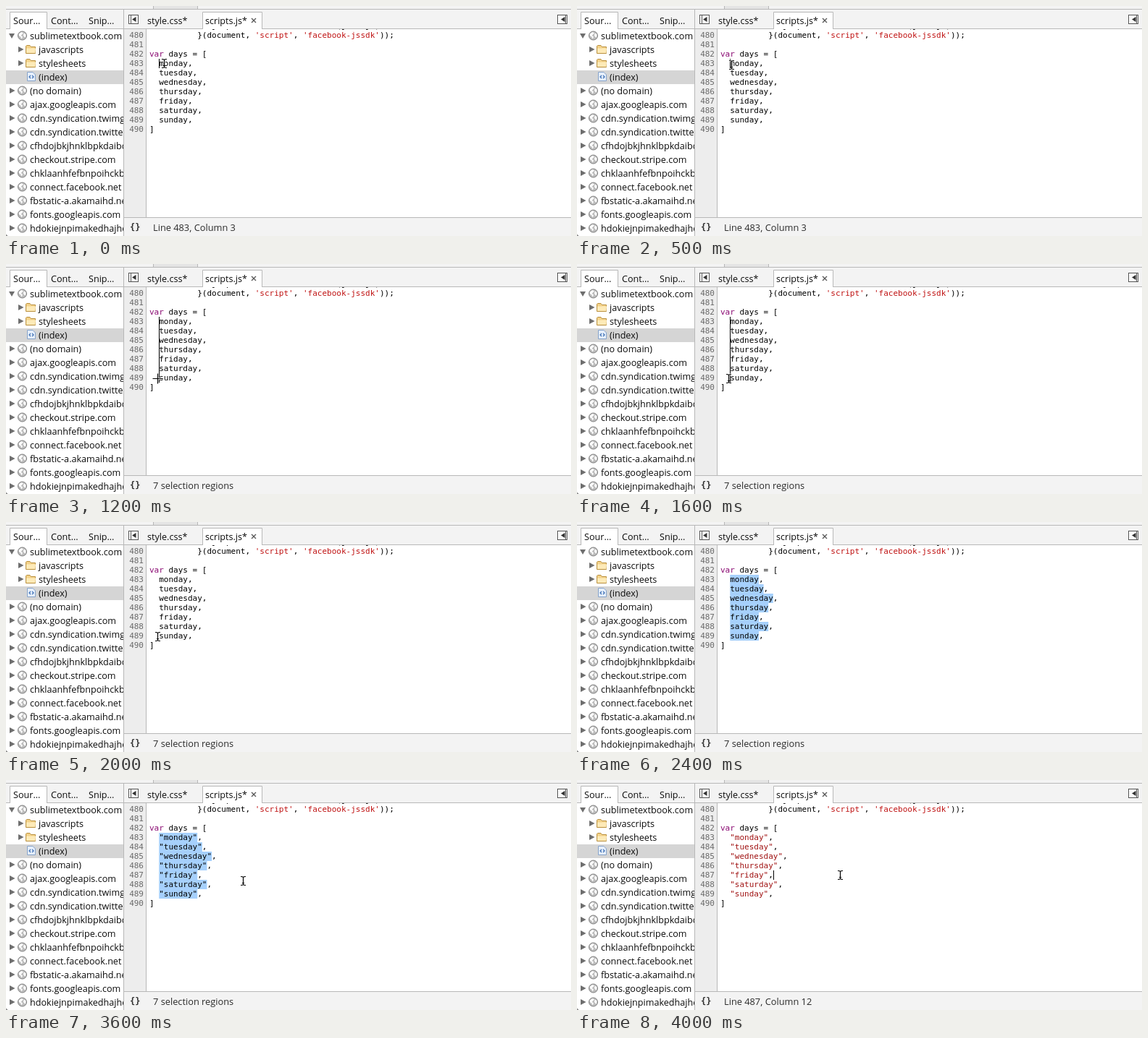
An HTML page that plays this animation: 780x318 px, repeating every 4.2 s.

```html
<!DOCTYPE html>
<html lang="en">
<head>
<meta charset="utf-8">
<title>Multiple selections</title>
<style>
html, body { margin: 0; width: 100%; height: 100%; overflow: hidden; background: #fff; }
svg { display: block; width: 780px; height: 318px; }
text { white-space: pre; }
.ui { font: 12.6px "Open Sans", "Noto Sans", sans-serif; fill: #0c0c0c; }
.code { font: 11px "DejaVu Sans Mono", "Noto Sans Mono", monospace; fill: #000; }
.num { fill: #6a6a6a; text-anchor: end; }
.kw { fill: #8a0a72; }
.str { fill: #c01414; }
.day { fill: #a01212; }
.braces { font: bold 12px "DejaVu Sans Mono", monospace; fill: #333; }
#status { font-size: 12.8px; fill: #2c2c2c; }
.line { stroke: #b8b8b8; fill: none; }
</style>
</head>
<body>
<svg id="stage" viewBox="0 0 780 318">
  <defs>
    <clipPath id="sideClip"><rect y="32" width="162" height="286"/></clipPath>
    <clipPath id="codeClip"><rect x="163" y="32" width="617" height="260"/></clipPath>
    <g id="globe">
      <circle r="6" fill="#bdbdbd" stroke="#7e7e7e"/>
      <path d="M-4.6-2.6L-1-5L1.4-3.8L-.6-1.6L-2-.2L.4 1.4L-.8 4.6L-2.4 1.6L-4.8 0ZM2.4-3.6L5-1.6L4.4 2.4L2.4 1.6L1.4-.8Z" fill="#fff"/>
    </g>
    <g id="folder">
      <path d="M.5 11.5V1.5L1.5.5H6L7.5 2.5H13.5V11.5Z" fill="#f3d28a" stroke="#b98f3c"/>
      <path d="M1 4.5H14L13.5 11H1Z" fill="#fdeab8"/>
    </g>
    <g id="dock">
      <rect x=".5" y=".5" width="13" height="12" fill="#fafafa" stroke="#555"/>
      <path d="M10.5 3V10L5 6.5Z" fill="#333"/>
    </g>
  </defs>

  <rect width="780" height="318" fill="#fff"/>
  <rect width="780" height="31" fill="#f3f3f3"/>
  <rect x="203" width="62" height="4" fill="#e4e4e4"/>
  <path class="line" d="M0 4.5H780M203.5 0V4M264.5 0V4"/>
  <path class="line" d="M0 31.5H780"/>
  <path class="line" d="M5.5 32V8.5H56.5V32M271.5 32V8.5H353.5V32" style="fill:#fff"/>
  <path d="M6 31.5H56M272 31.5H353" stroke="#fff"/>
  <g class="ui">
    <text x="10" y="24.5">Sour…</text>
    <text x="62" y="24.5">Cont…</text>
    <text x="114" y="24.5">Snip…</text>
    <text x="195" y="24.5">style.css*</text>
    <text x="275" y="24.5">scripts.js*</text>
  </g>
  <path d="M339 17L345 23M345 17L339 23" stroke="#555" stroke-width="1.3"/>
  <use href="#dock" x="169" y="12"/>
  <use href="#dock" x="761" y="12"/>
  <path d="M172.5 13V24M772.5 13V24" stroke="#555"/>

  <g id="side" clip-path="url(#sideClip)"></g>

  <rect x="163" y="32" width="31" height="260" fill="#ededed"/>
  <path class="line" d="M193.5 32V292"/>
  <g clip-path="url(#codeClip)">
    <g id="marks"></g>
    <g id="code" class="code"></g>
    <path id="carets" stroke="#000"/>
  </g>

  <rect x="163" y="292" width="617" height="26" fill="#f3f3f3"/>
  <path class="line" d="M163 292.5H780M162.5 5V318"/>
  <text class="braces" x="171" y="310">{}</text>
  <text id="status" class="ui" x="203" y="311"></text>
  <path d="M0 315Q.5 317.5 3 318H0Z" fill="#777"/>
  <g id="mouse" fill="none">
    <path id="halo" stroke="#fff" stroke-width="3" opacity=".8"/>
    <path id="shape" stroke="#000" stroke-width="1.2"/>
  </g>
</svg>
<script>
const LOOP = 4200, STEP = 100;
const CHAR = 6.622, LEFT = 198, ROW = 13, FIRST = 483;
const days = ['monday', 'tuesday', 'wednesday', 'thursday', 'friday', 'saturday', 'sunday'];
const $ = id => document.getElementById(id);
const span = (cls, s) => `<tspan class="${cls}">${s}</tspan>`;
const rowTop = n => 73 + (n - FIRST) * ROW;
const colX = c => LEFT + c * CHAR;

// Sidebar tree
const tree = [
  'sublimetextbook.com', '/javascripts', '/stylesheets', '#(index)', '(no domain)',
  'ajax.googleapis.com', 'cdn.syndication.twimg.com', 'cdn.syndication.twitter.com',
  'cfhdojbkjhnklbpkdaibdccddilifddb', 'checkout.stripe.com', 'chklaanhfefbnpoihckbnefhakgolnmc',
  'connect.facebook.net', 'fbstatic-a.akamaihd.net', 'fonts.googleapis.com',
  'hdokiejnpimakedhajhdlcegeplioahd'
];
const arrow = (x, y) => `<path d="M${x} ${y - 4}L${x + 7.5} ${y}L${x} ${y + 4}Z" fill="#6e6e6e"/>`;

function treeRow(name, i) {
  const y = 41 + i * 19;
  const label = (x, s) => `<text class="ui" x="${x}" y="${y + 4.5}">${s}</text>`;
  if (name[0] === '/')
    return arrow(17, y) + `<use href="#folder" x="27" y="${y - 6}"/>` + label(45, name.slice(1));
  if (name[0] === '#')
    return `<rect y="${y - 9}" width="162" height="19" fill="#d5d5d5"/>
      <path d="M29.5 ${y - 6.5}H37L40.5 ${y - 3}V${y + 5.5}H29.5Z" fill="#e6effb" stroke="#86a3c9"/>
      <path d="M34 ${y - 2}L32 ${y}L34 ${y + 2}M36 ${y - 2}L38 ${y}L36 ${y + 2}" fill="none" stroke="#3d6fb5" stroke-width="1.2"/>`
      + label(45, name.slice(1));
  const open = `<path d="M4 ${y - 3}H12L8 ${y + 4}Z" fill="#6e6e6e"/>`;
  return (i ? arrow(5, y) : open) + `<use href="#globe" x="22.5" y="${y}"/>` + label(33, name);
}
$('side').innerHTML = tree.map(treeRow).join('');

// Code; selected words lose their syntax colour
function drawCode(quoted, selected) {
  const word = d => !quoted ? d : selected ? `"${d}"` : span('day', `"${d}"`);
  const lines = [
    ' '.repeat(12) + 'fjs.parentNode.insertBefore(js, fjs);',
    ' '.repeat(10) + `}(document, ${span('str', "'script'")}, ${span('str', "'facebook-jssdk'")}));`,
    '',
    span('kw', 'var') + ' days = [',
    ...days.map(d => `  ${word(d)},`),
    ']'
  ];
  $('code').innerHTML = lines.map((s, i) => {
    const n = 479 + i, y = rowTop(n) + 10;
    return `<text class="num" x="190" y="${y}">${n}</text><text x="${LEFT}" y="${y}">${s}</text>`;
  }).join('');
}

function drawMarks(on, quoted) {
  $('marks').innerHTML = !on ? '' : days.map((d, i) =>
    `<rect x="${colX(2)}" y="${rowTop(FIRST + i)}" width="${(d.length + (quoted ? 2 : 0)) * CHAR}" height="${ROW}" fill="#a6d0fc"/>`
  ).join('');
}

const caret = (n, c) => `M${Math.round(colX(c)) + .5} ${rowTop(n)}v${ROW}`;

// Pointer keys: time, x, y
const path = [
  [0, 218, 79], [300, 214, 80], [600, 212, 82], [700, 212, 98], [800, 213, 116], [900, 213, 131],
  [1000, 211, 143], [1100, 210, 153], [1200, 209, 158], [3300, 209, 158], [3500, 290, 146],
  [3700, 363, 131], [4200, 363, 131]
];
function pointer(t) {
  const i = Math.max(1, path.findIndex(k => k[0] >= t));
  const [a, b] = [path[i - 1], path[i]], f = (t - a[0]) / (b[0] - a[0]);
  return [1, 2].map(k => Math.round(a[k] + (b[k] - a[k]) * f));
}
const BEAM = 'M-3.5-6Q-.5-6 0-5Q.5-6 3.5-6M0-5V5M-3.5 6Q-.5 6 0 5Q.5 6 3.5 6M-1.5 3H1.5';
const CROSS = 'M-7 0H7M0-7V7';

function draw(t) {
  const regions = t < 700 ? 1 : Math.min(7, 2 + (t - 700) / STEP);
  const quoted = t >= 2900, clicked = t >= 3800, selected = t >= 2400 && !clicked;
  drawCode(quoted, selected);
  drawMarks(selected, quoted);

  let d = '';
  if (clicked) d = caret(487, 11);
  else if (t < 1800 || (t >= 2300 && !selected))
    for (let i = 0; i < regions; i++) d += caret(FIRST + i, 2);
  $('carets').setAttribute('d', d);

  $('status').textContent = clicked ? 'Line 487, Column 12'
    : regions < 2 ? 'Line 483, Column 3' : regions + ' selection regions';

  const shape = t >= 1000 && t < 1500 ? CROSS : BEAM;
  for (const id of ['halo', 'shape']) $(id).setAttribute('d', shape);
  $('mouse').setAttribute('transform', `translate(${pointer(t).map(v => v + .5)})`);
  $('mouse').setAttribute('visibility', t >= 2400 && t < 3400 ? 'hidden' : 'visible');
}

let last = -1;
function tick() {
  const t = Math.floor(performance.now() % LOOP / STEP) * STEP;
  if (t !== last) draw(last = t);
  requestAnimationFrame(tick);
}
tick();
</script>
</body>
</html>
```
